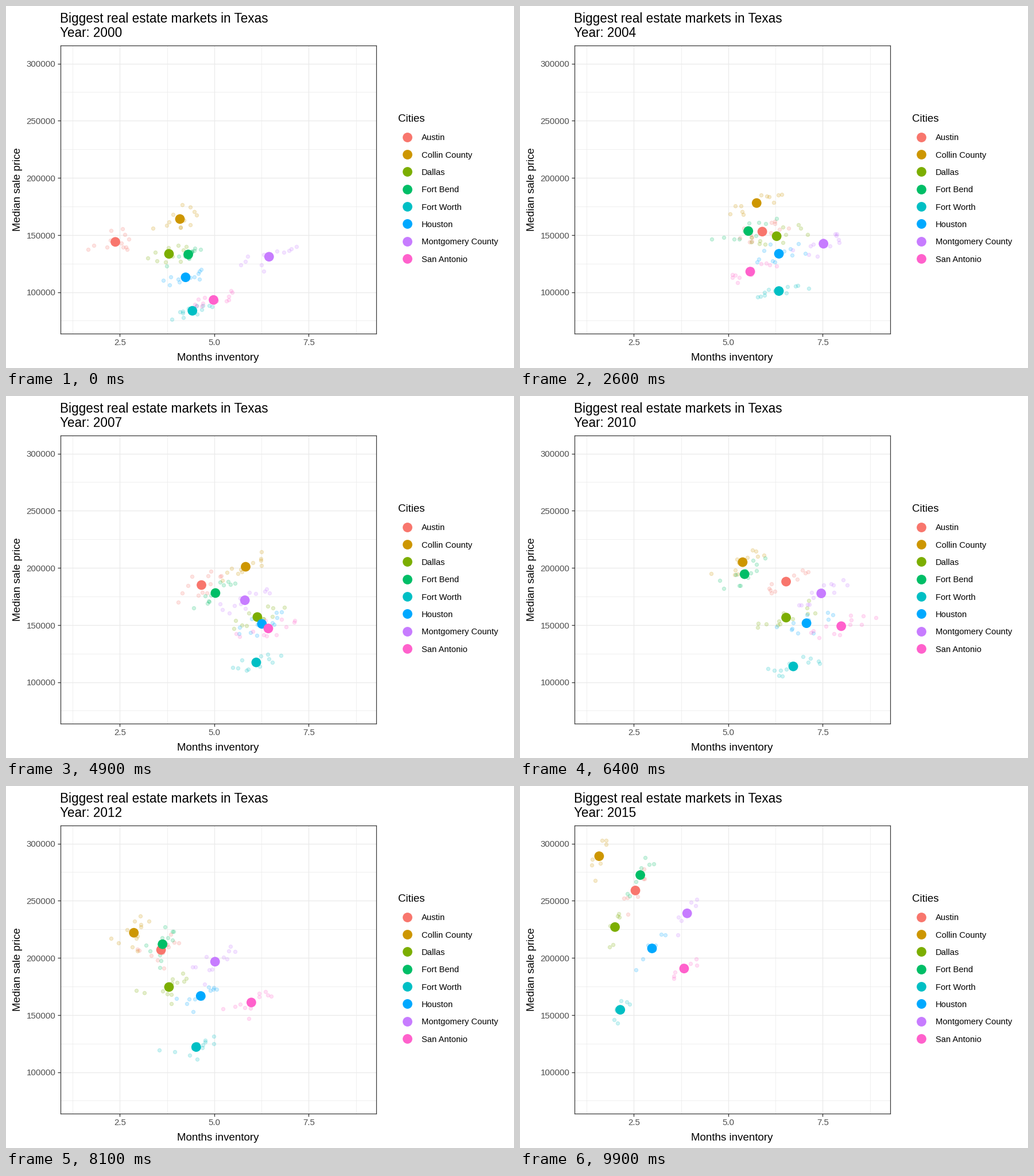
Animation, 885 px wide and 632 px high, one loop 10000 ms. Source, as a matplotlib script:

```python
import numpy as np
import matplotlib.pyplot as plt
from matplotlib.animation import FuncAnimation

W, H, DPI = 885, 632, 72          # at 72 dpi one point is one pixel
FRAMES, YEARS, LAST_MONTHS = 100, 16, 7
STEPS_PER_YEAR = (FRAMES - 1) / (YEARS - 1)
LEFT, RIGHT, TOP, BOTTOM = 95, 645, 69, 572
X0, X_UNIT = 33.9, 65.8           # pixel of 0 months, pixels per month
Y100, Y_UNIT = 499.6, 1.995       # pixel of 100 thousand, pixels per thousand
INK, GREY, GRID = "#333333", "#4D4D4D", "#EBEBEB"

plt.rcParams["font.family"] = "Liberation Sans"

# Turning points of each market: months of inventory, price in thousands
STOPS = np.array([0, 15, 26, 49, 64, 81, 99]) / STEPS_PER_YEAR
CITIES = {
    "Austin": ("#F8766D", [2.38, 5.93, 5.90, 4.66, 6.53, 3.59, 2.54],
               [144, 154, 153, 185, 188, 207, 259]),
    "Collin County": ("#CD9600", [4.09, 5.81, 5.75, 5.83, 5.38, 2.87, 1.58],
                      [164, 176, 178, 201, 205, 222, 289]),
    "Dallas": ("#7CAE00", [3.80, 5.76, 6.28, 6.14, 6.53, 3.80, 2.00],
               [133.5, 145.5, 149, 157, 156.5, 174.5, 227]),
    "Fort Bend": ("#00BE67", [4.31, 4.60, 5.53, 5.03, 5.43, 3.63, 2.67],
                  [133, 151.5, 153.5, 178, 194.5, 212, 272.5]),
    "Fort Worth": ("#00BFC4", [4.42, 5.46, 6.34, 6.11, 6.72, 4.52, 2.14],
                   [83.7, 96, 101, 117.3, 113.8, 122, 154.6]),
    "Houston": ("#00A9FF", [4.24, 5.52, 6.34, 6.26, 7.07, 4.64, 2.98],
                [113, 130, 133.6, 151, 151.6, 166.7, 208.3]),
    "Montgomery County": ("#C77CFF", [6.45, 8.18, 7.52, 5.81, 7.46, 5.02, 3.91],
                          [131, 140, 142.4, 171.7, 177.7, 196.7, 239]),
    "San Antonio": ("#FF61CC", [4.98, 5.46, 5.58, 6.43, 7.99, 5.98, 3.83],
                    [93.2, 108, 118, 147, 149, 161, 190.7]),
}
COLORS = [c for c, _, _ in CITIES.values()]
POINTS = np.array([[inv, price] for _, inv, price in CITIES.values()])
SLOPES = np.gradient(POINTS, STOPS, axis=2)

MONTH = np.arange(12)
NOISE = np.random.default_rng(4).normal(0, 1, (YEARS, len(CITIES), 2, 12))


def center(t):
    """Smooth path through the turning points; (city, axis) at year t."""
    t = np.clip(t, 0, YEARS - 1)
    i = min(np.searchsorted(STOPS, t, side="right") - 1, len(STOPS) - 2)
    h = STOPS[i + 1] - STOPS[i]
    u = (t - STOPS[i]) / h
    a, b = POINTS[..., i], POINTS[..., i + 1]
    ma, mb = SLOPES[..., i] * h, SLOPES[..., i + 1] * h
    ease = u * u * (3 - 2 * u)
    return a + (b - a) * ease + u * (1 - u) * (ma * (1 - u) - mb * u)


def cloud(t):
    """Monthly dots around each center: trend, season and noise."""
    mid = center(t)
    trend = (center(t + 0.5) - center(t - 0.5))[..., None] * (MONTH - 5.5) / 12
    scale = np.stack([0.1 + 0.07 * mid[:, 0], 0.055 * mid[:, 1]], axis=1)[..., None]
    season = np.cos(2 * np.pi * (MONTH - np.array([[6], [5]])) / 12)
    y = min(int(t), YEARS - 2)
    noise = NOISE[y] + (NOISE[y + 1] - NOISE[y]) * (t - y)
    dots = trend + scale * (season + 0.35 * noise)
    if t > YEARS - 2:              # the final year stops in July
        dots = dots[..., :LAST_MONTHS]
    return mid[..., None] + dots - dots.mean(axis=2, keepdims=True)


fig = plt.figure(figsize=(W / DPI, H / DPI), dpi=DPI, facecolor="white")


def label(x, y, text, size, **kw):
    return fig.text(x / W, 1 - y / H, text, fontsize=size, va="baseline", **kw)


def x_px(v):
    return X0 + X_UNIT * v


def y_px(v):
    return Y100 - Y_UNIT * (v - 100)


ax = fig.add_axes([LEFT / W, 1 - BOTTOM / H, (RIGHT - LEFT) / W, (BOTTOM - TOP) / H])
ax.set_xlim((LEFT - X0) / X_UNIT, (RIGHT - X0) / X_UNIT)
ax.set_ylim(100 + (Y100 - BOTTOM) / Y_UNIT, 100 + (Y100 - TOP) / Y_UNIT)
ax.set_axisbelow(True)
x_ticks, y_ticks = np.arange(2.5, 8, 2.5), np.arange(100, 301, 50)
ax.set_xticks(x_ticks)
ax.set_yticks(y_ticks)
ax.set_xticks(np.arange(1.25, 9, 2.5), minor=True)
ax.set_yticks(np.arange(75, 276, 50), minor=True)
ax.tick_params(which="major", length=4.7, width=1.3, color=INK,
               labelbottom=False, labelleft=False)
ax.tick_params(which="minor", length=0)
ax.grid(which="major", color=GRID, lw=1.4)
ax.grid(which="minor", color=GRID, lw=0.8)
for spine in ax.spines.values():
    spine.set(color=INK, linewidth=1.2)

for v in x_ticks:
    label(x_px(v), 592.5, f"{v:.1f}", 15, color=GREY, ha="center")
for v in y_ticks:
    label(86.5, y_px(v) + 5.7, f"{v}000", 15, color=GREY, ha="right")
label(369.5, 619, "Months inventory", 18.7, ha="center")
label(25.5, 320, "Median sale price", 18.6, ha="center",
      rotation=90, rotation_mode="anchor")
label(94.5, 28.5, "Biggest real estate markets in Texas", 22.5)
year_text = label(94.5, 53.5, "", 22.5)

# Legend
label(683.5, 202.5, "Cities", 18.8)
key_ax = fig.add_axes([0, 0, 1, 1])
key_ax.set(xlim=(0, W), ylim=(H, 0))
key_ax.axis("off")
for i, (name, color) in enumerate(zip(CITIES, COLORS)):
    y = 228.6 + 30.36 * i
    key_ax.scatter(699.2, y, s=16.8 ** 2, color=color, linewidths=0)
    label(723.5, y + 5.7, name, 14.75)

small = [ax.scatter([], [], s=6.2 ** 2, color=c, alpha=0.2, linewidths=1.1, zorder=3)
         for c in COLORS]
big = ax.scatter([0] * len(COLORS), [0] * len(COLORS), s=16.8 ** 2, c=COLORS,
                 linewidths=0, zorder=4)


def draw(k):
    t = k / STEPS_PER_YEAR
    year_text.set_text(f"Year: {2000 + round(t)}")
    big.set_offsets(center(t))
    for dots, xy in zip(small, cloud(t)):
        dots.set_offsets(xy.T)
    return [year_text, *small, big]


anim = FuncAnimation(fig, draw, frames=FRAMES, interval=100, repeat=True,
                     repeat_delay=0, blit=False)
plt.show()
```
